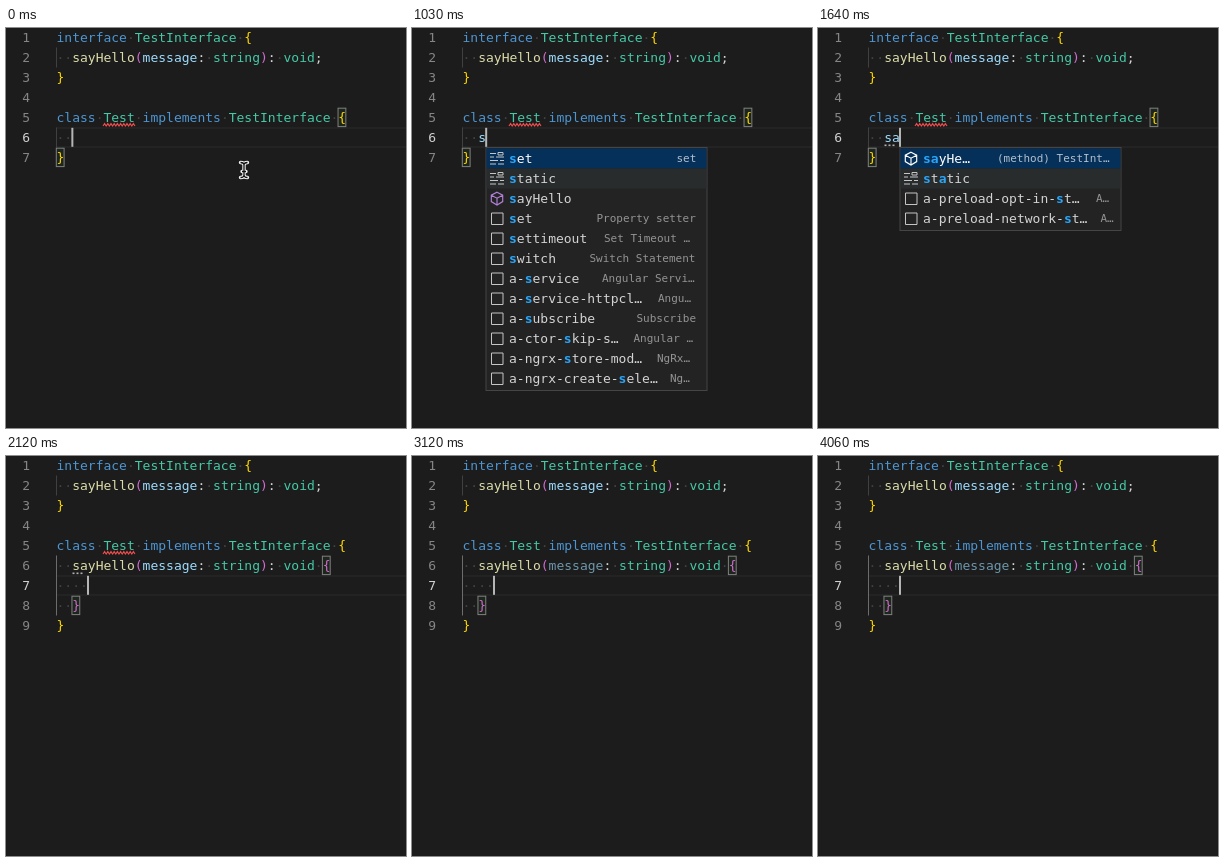
Animation, 400 px wide and 400 px high, one loop 4090 ms. Source, as an HTML page:

```html
<!DOCTYPE html>
<html lang="en">
<head>
<meta charset="utf-8">
<title>Editor completion</title>
<style>
  html, body { margin: 0; width: 100%; height: 100%; overflow: hidden; background: #1c1c1c; }
  svg { display: block; width: 100vw; height: 100vh; }
  text { font: 13px "DejaVu Sans Mono", "Liberation Mono", monospace; white-space: pre; }
  .detail { font-size: 11px; }
</style>
</head>
<body>
<svg id="stage" viewBox="0 0 400 400"></svg>
<script>
(() => {
const LOOP = 4090, LEFT = 50.5, CHAR = 7.826;
const TYPE_S = 830, OPEN = 890, TYPE_A = 1310, FILTER = 1370, ACCEPT = 1880, CHECKED = 2560;

const C = {
  bg: '#1c1c1c', keyword: '#4d96d3', type: '#45c9a7', fn: '#dcdcaa', param: '#9cdcfe',
  plain: '#d4d4d4', gold: '#ffd700', pink: '#d16bce', dot: '#424242', guide: '#404040',
  activeGuide: '#6c6c6c', num: '#858585', activeNum: '#d0d0d0', match: '#2aa5f7',
  detail: '#949494', menu: '#232324', edge: '#454545', hover: '#292c2d', selected: '#05305a',
  cube: '#b180d7', error: '#f14c4c', icon: '#c5c5c5'
};
const WORDS = {
  interface: C.keyword, class: C.keyword, implements: C.keyword,
  Test: C.type, TestInterface: C.type, string: C.type, void: C.type,
  sayHello: C.fn, message: C.param, s: C.param, sa: C.param, '(': C.pink, ')': C.pink
};

const stage = document.getElementById('stage');
const parts = [];

function add(parent, tag, attrs, text) {
  const el = document.createElementNS('http://www.w3.org/2000/svg', tag);
  for (const k in attrs) el.setAttribute(k, attrs[k]);
  if (text !== undefined) el.textContent = text;
  parent.appendChild(el);
  return el;
}
const box = (g, x, y, width, height, fill) => add(g, 'rect', { x, y, width, height, fill });
const stroke = (g, d, color, extra) => add(g, 'path', { d, fill: 'none', stroke: color, ...extra });
const rowY = n => 20 * (n - 1);
const colX = c => LEFT + c * CHAR;

// A group shown only while start <= t < end.
function during(start, end) {
  const el = add(stage, 'g', {});
  parts.push({ el, start, end });
  return el;
}

function code(g, n, src, { brace = C.gold, dimParam = false } = {}) {
  const line = add(g, 'text', { x: LEFT, y: rowY(n) + 14 });
  for (const tok of src.match(/\w+|./g)) {
    const space = tok === ' ';
    const fill = space ? C.dot : /[{}]/.test(tok) ? brace : WORDS[tok] || C.plain;
    const span = add(line, 'tspan', { fill }, space ? '·' : tok);
    if (dimParam && tok === 'message') span.setAttribute('fill-opacity', 0.64);
  }
}

function numbers(g, from, to, active) {
  for (let n = from; n <= to; n++)
    add(g, 'text', { x: 24, y: rowY(n) + 14, 'text-anchor': 'end', fill: n === active ? C.activeNum : C.num }, n);
}

function currentLine(g, n) {
  box(g, 50, rowY(n) - 0.5, 350, 1, '#2a2a2a');
  box(g, 50, rowY(n) + 18.5, 350, 1, '#2a2a2a');
}

function bracketBox(g, n, col) {
  add(g, 'rect', { x: colX(col) - 0.2, y: rowY(n) + 0.2, width: 7.8, height: 18.4, fill: '#1d261d', stroke: '#818181' });
}

const guide = (g, n, rows, color) => box(g, 50, rowY(n) - 0.5, 1, 20 * rows, color);
const caret = (g, n, col) => box(g, colX(col) - 0.8, rowY(n) - 0.2, 2, 19, '#b5b6b4');

function keywordIcon(g, x, y) {
  stroke(g, `M${x} ${y - 5}h6M${x} ${y - 1.5}h4m2 0h8M${x} ${y + 2}h8m2 0h4M${x} ${y + 5.5}h6m2 0h6`, C.icon);
  stroke(g, `M${x + 8} ${y - 6}h5v2.5h-5z`, C.icon);
}
const snippetIcon = (g, x, y) => stroke(g, `M${x + 1.5} ${y - 5.5}h11.5v11.5h-11.5z`, C.icon);
function methodIcon(g, x, y, color) {
  stroke(g, `M${x + 7} ${y - 6.3}l5.7 3v6.4l-5.7 3.4l-5.7 -3.4v-6.4zM${x + 1.3} ${y - 3.3}l5.7 3l5.7 -3M${x + 7} ${y - 0.3}v6.6`,
    color, { 'stroke-width': 1.15 });
}

// Rows: icon, label with matches in [], detail, detail offset.
function menu(g, x, rows) {
  const height = rows.length * 20 + 3;
  add(g, 'rect', { x, y: 119.5, width: 221, height, fill: C.menu, stroke: C.edge });
  rows.forEach(([icon, label, detail, dx], i) => {
    const y = 120.5 + 20 * i, mid = y + 10, first = i === 0;
    if (i < 2) box(g, x + 0.5, y, 220, 20, first ? C.selected : C.hover);
    if (icon === 'k') keywordIcon(g, x + 4, mid);
    if (icon === 's') snippetIcon(g, x + 4, mid);
    if (icon === 'm') methodIcon(g, x + 4, mid, first ? '#fff' : C.cube);
    const line = add(g, 'text', { x: x + 23, y: y + 14.5 });
    label.split(/[\[\]]/).forEach((s, j) => {
      const hit = j % 2;
      if (s) add(line, 'tspan', { fill: hit ? C.match : first ? '#fff' : C.plain, 'font-weight': hit ? 700 : 400 }, s);
    });
    if (detail) add(g, 'text', { x: x + dx, y: y + 13.5, class: 'detail', fill: first ? '#b4c0cc' : C.detail }, detail);
  });
}

// Line numbers and guide that never change
const base = during(0, LOOP);
box(base, 0, 0, 400, 400, C.bg);
numbers(base, 1, 5);
guide(base, 2, 1, C.guide);

// Empty class body
const before = during(0, ACCEPT);
numbers(before, 6, 7, 6);
currentLine(before, 6);
guide(before, 6, 1, C.guide);
bracketBox(before, 5, 36);
bracketBox(before, 7, 0);
code(before, 7, '}');

const fixed = during(0, LOOP);
code(fixed, 1, 'interface TestInterface {');
code(fixed, 2, '  sayHello(message: string): void;');
code(fixed, 3, '}');
code(fixed, 5, 'class Test implements TestInterface {');

[['  ', 0, TYPE_S], ['  s', TYPE_S, TYPE_A], ['  sa', TYPE_A, ACCEPT]].forEach(([src, start, end]) => {
  const g = during(start, end);
  code(g, 6, src);
  caret(g, 6, src.length);
});

// Method inserted
const after = during(ACCEPT, LOOP);
numbers(after, 6, 9, 7);
currentLine(after, 7);
guide(after, 6, 3, C.activeGuide);
bracketBox(after, 6, 34);
bracketBox(after, 8, 2);
code(after, 7, '    ');
code(after, 8, '  }', { brace: C.pink });
code(after, 9, '}');
caret(after, 7, 4);
const method = '  sayHello(message: string): void {';
code(during(ACCEPT, CHECKED), 6, method, { brace: C.pink });
code(during(CHECKED, LOOP), 6, method, { brace: C.pink, dimParam: true });

// Diagnostics
const wave = 'M97 98' + 'l1.6 -2.4l1.6 2.4'.repeat(10);
stroke(during(0, CHECKED), wave, C.error, { 'stroke-width': 1.1 });
const hint = during(FILTER, CHECKED);
for (let i = 0; i < 3; i++) box(hint, 66.5 + i * 4, 116.5, 2, 1.6, '#b0b0b0');

// Completion lists
menu(during(OPEN, FILTER), 74, [
  ['k', '[s]et', 'set', 190.5],
  ['k', '[s]tatic'],
  ['m', '[s]ayHello'],
  ['s', '[s]et', 'Property setter', 110.5],
  ['s', '[s]ettimeout', 'Set Timeout …', 118],
  ['s', '[s]witch', 'Switch Statement', 103.5],
  ['s', 'a-[s]ervice', 'Angular Servi…', 116],
  ['s', 'a-[s]ervice-httpcl…', 'Angu…', 172],
  ['s', 'a-[s]ubscribe', 'Subscribe', 150.5],
  ['s', 'a-ctor-[s]kip-s…', 'Angular …', 147.5],
  ['s', 'a-ngrx-[s]tore-mod…', 'NgRx…', 171],
  ['s', 'a-ngrx-create-[s]ele…', 'Ng…', 184]
]);
menu(during(FILTER, ACCEPT), 82, [
  ['m', '[sa]yHe…', '(method) TestInt…', 97],
  ['k', '[s]t[a]tic'],
  ['s', 'a-preload-opt-in-[s]t…', 'A…', 196],
  ['s', 'a-preload-network-[s]t…', 'A…', 200.5]
]);

// Mouse pointer
const mouse = during(0, TYPE_S);
const beam = 'M234.5 134.5q3.5 0 3.5 2.5q0 -2.5 3.5 -2.5M238 137v10M234.5 149.5q3.5 0 3.5 -2.5q0 2.5 3.5 2.5M236 143.5h4';
stroke(mouse, beam, '#f2f2f2', { 'stroke-width': 3.4, 'stroke-linecap': 'round' });
stroke(mouse, beam, '#111', { 'stroke-width': 1.3 });

const began = performance.now();
function frame() {
  const t = (performance.now() - began) % LOOP;
  for (const p of parts) p.el.style.display = t >= p.start && t < p.end ? '' : 'none';
  requestAnimationFrame(frame);
}
frame();
})();
</script>
</body>
</html>
```
